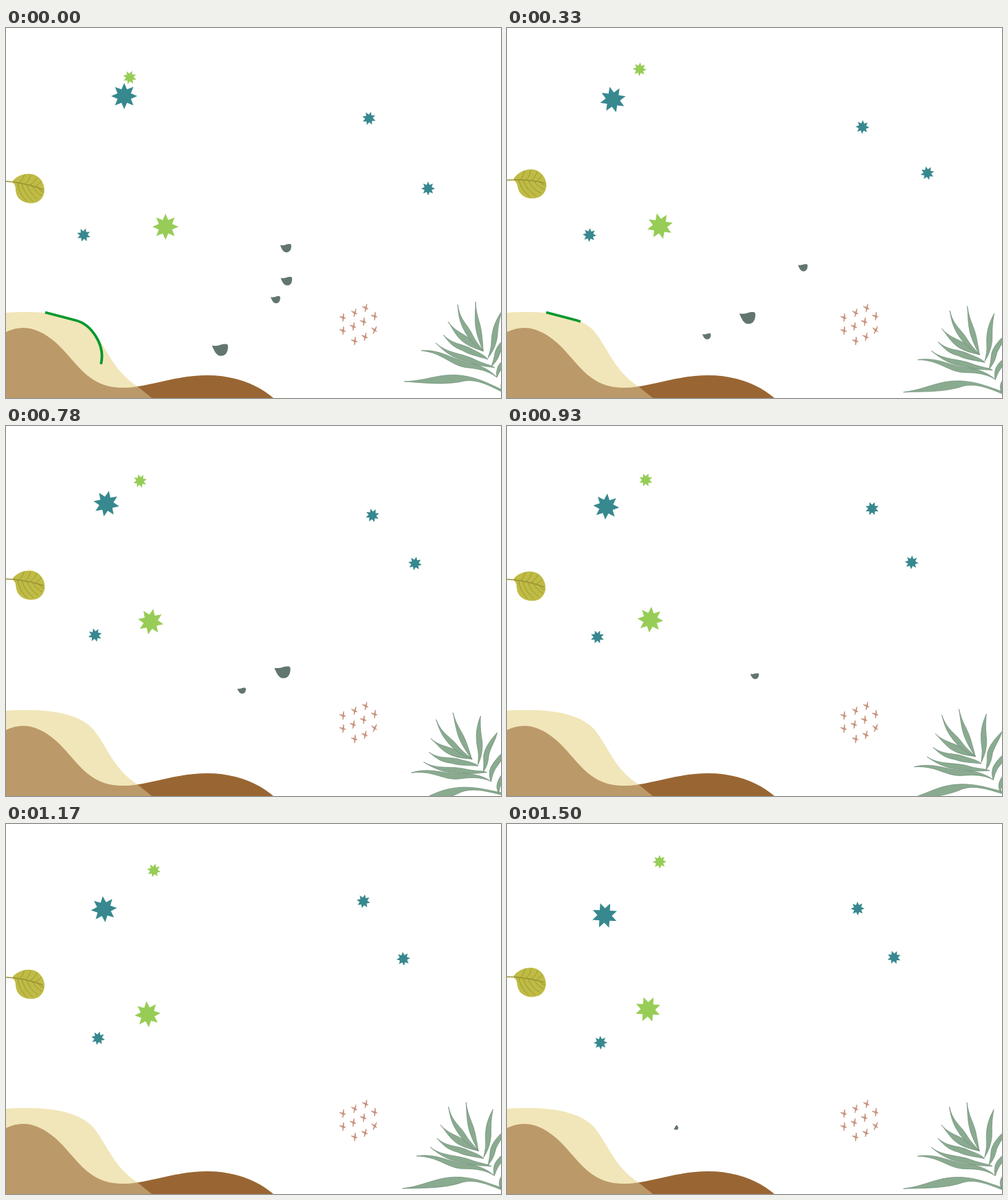
Write an HTML page without scripts that moves like this. It is 720 px wide and 538 px high and loops after 1530 ms.

```html
<!DOCTYPE html>
<html lang="en">
<head>
<meta charset="utf-8">
<title>Drifting garden</title>
<style>
html, body { margin: 0; width: 100%; height: 100%; overflow: hidden; background: #fff; }
svg { display: block; width: 720px; height: 538px; }

.drift, .wander, .spin, .palm, .leaf, .vine, .rock {
  animation: 1.53s linear infinite;
}
.drift { animation-name: drift; }
.wander { animation-name: wander; }
.spin { animation-name: spin; }
.palm { animation-name: sway; transform-origin: 747px 548px; }
.leaf { animation-name: bob; transform-origin: -12px 222px; }
.vine { animation-name: retract; stroke-dasharray: 100 200; }
.rock { animation-name: fly, var(--life); animation-timing-function: linear, var(--pace, step-end); }

.teal { fill: #37888f; }
.lime { fill: #97cd56; }

/* Stars pass through --a to --g; wanderers also bend through the midpoints. */
@keyframes drift {
  0% { translate: var(--a); }
  21.57% { translate: var(--b); }
  35.29% { translate: var(--c); }
  50.98% { translate: var(--d); }
  68.63% { translate: var(--e); }
  84.31% { translate: var(--f); }
  98.04%, 100% { translate: var(--g); }
}
@keyframes wander {
  0% { translate: var(--a); }
  10.78% { translate: var(--ab); }
  21.57% { translate: var(--b); }
  28.43% { translate: var(--bc); }
  35.29% { translate: var(--c); }
  43.14% { translate: var(--cd); }
  50.98% { translate: var(--d); }
  59.8% { translate: var(--de); }
  68.63% { translate: var(--e); }
  76.47% { translate: var(--ef); }
  84.31% { translate: var(--f); }
  91.18% { translate: var(--fg); }
  98.04%, 100% { translate: var(--g); }
}
@keyframes spin { to { rotate: -66deg; } }
@keyframes sway {
  0% { rotate: 0deg; animation-timing-function: cubic-bezier(.45, .1, .8, .65); }
  21.57% { rotate: -5.2deg; }
  35.29% { rotate: -12.2deg; animation-timing-function: ease-out; }
  44.5% { rotate: -14deg; animation-timing-function: ease-in; }
  50.98% { rotate: -13.4deg; }
  68.63% { rotate: -7.7deg; animation-timing-function: ease-out; }
  84.31% { rotate: -4.4deg; }
  90% { rotate: -4.3deg; }
  98.04%, 100% { rotate: -5.5deg; }
}
@keyframes bob {
  0% { rotate: 0deg; }
  21.57% { rotate: -8.2deg; animation-timing-function: ease-out; }
  28% { rotate: -8.6deg; animation-timing-function: ease-in; }
  35.29% { rotate: -7deg; }
  50.98% { rotate: -2.4deg; animation-timing-function: ease-out; }
  68.63% { rotate: 0deg; animation-timing-function: ease-in; }
  84.31% { rotate: -1.6deg; }
  98.04%, 100% { rotate: -3.8deg; }
}
@keyframes retract {
  0% { stroke-dashoffset: 0; }
  21.57% { stroke-dashoffset: 59; }
  35.29% { stroke-dashoffset: 87; }
  43.14%, 100% { stroke-dashoffset: 100.5; }
}
@keyframes fly { to { translate: 178px -216px; } }
@keyframes brief { 11%, to { scale: 0; } }
@keyframes medium { 43%, to { scale: 0; } }
@keyframes long { 60%, to { scale: 0; } }
@keyframes emerge {
  0%, 10% { scale: 0; }
  20%, 76% { scale: 1; }
  76.1%, 100% { scale: 0; }
}
@keyframes sprout {
  0%, 93% { scale: 0; }
  98%, 100% { scale: 1; }
}
</style>
</head>
<body>
<svg viewBox="0 0 720 538">
  <defs>
    <polygon id="star" points="0-19 4-9.700 13.400-13.400 9.700-4 19 0 9.700 4 13.400 13.400 4 9.700 0 19 -4 9.700 -13.400 13.400 -9.700 4 -19 0 -9.700-4 -13.400-13.400 -4-9.700"/>
    <path id="rock" fill="#62766f" d="M-12-6Q-4-5 0-7Q5-9 10-8Q12-6 11-1C10 6 6 9 1 9C-6 9-9 1-12-6Z"/>
    <path id="twig" d="M1-6Q2.500 0 0 6Q-1 0 1-6ZM-5-1.500Q0-1.500 4 1Q0 2.500-5-1.500Z"/>
    <path id="sand" d="M0 414C45 411 100 413 126 440C147 465 155 498 191 521L212 538H0Z"/>
  </defs>

  <!-- hills -->
  <use href="#sand" fill="#f1e6b9"/>
  <path fill="#996633" d="M0 442C24 430 48 436 72 457C104 486 118 523 170 523C206 523 244 505 293 505C335 505 368 520 389 538H0Z"/>
  <use href="#sand" fill="#f1e6b9" opacity=".4"/>
  <path class="vine" pathLength="100" fill="none" stroke="#00982f" stroke-width="3.8" d="M57 413.500L101 425C125 431 145 462 138 489"/>

  <!-- twigs -->
  <g fill="#c8917c" stroke="#c8917c" stroke-width=".8">
    <use href="#twig" transform="translate(490 421)"/>
    <use href="#twig" transform="translate(507 414) rotate(10)"/>
    <use href="#twig" transform="translate(523 407) rotate(8)"/>
    <use href="#twig" transform="translate(536 419)"/>
    <use href="#twig" transform="translate(520 427)"/>
    <use href="#twig" transform="translate(505 434) rotate(4)"/>
    <use href="#twig" transform="translate(490 440)"/>
    <use href="#twig" transform="translate(507 455)"/>
    <use href="#twig" transform="translate(522 449) rotate(8)"/>
    <use href="#twig" transform="translate(536 439) rotate(20)"/>
  </g>

  <!-- palm -->
  <g class="palm" fill="#8aab90" stroke="#66866f" stroke-width=".6">
    <path d="M579 514C615 513 632 500 668 506C690 510 704 518 724 527L723 530C700 518 685 511 668 513C640 520 610 516 579 514Z"/>
    <path d="M604 469C632 467 648 481 670 486C690 490 704 497 714 508C702 499 690 496 672 494C647 492 638 473 604 469Z"/>
    <path d="M625 458C642 474 664 472 684 483C697 489 706 490 711 494C700 492 690 492 674 486C652 481 640 473 625 458Z"/>
    <path d="M636 446C650 461 664 458 680 468C690 473 698 477 701 482C690 478 675 476 664 469C650 464 645 458 636 446Z"/>
    <path d="M643 427C652 441 668 445 677 454C685 461 691 465 695 470C681 466 668 461 659 451C652 443 649 436 643 427Z"/>
    <path d="M657 402C660 425 672 431 679 447C684 457 690 463 694 470C682 462 672 451 666 439C659 425 658 416 657 402Z"/>
    <path d="M683 398C684 420 690 427 692 444C693 455 694 462 694 470C687 453 683 441 682.500 428C682 414 683 408 683 398Z"/>
    <path d="M721 412C710 428 707 440 706 455C706 465 704 470 701 480C709 470 714 458 715 446C716 434 717 426 721 412Z"/>
    <path d="M739 441C724 451 713 462 711 473C710 480 708 486 706 492C715 484 717 477 720 469C726 458 734 452 739 441Z"/>
    <path d="M745 468C732 475 717 486 715 494C713 500 713 504 714 508C717 502 719 497 725 491C733 484 741 478 745 468Z"/>
    <path d="M750 490C737 495 724 507 721 515C719 520 720 524 721 527C725 518 728 512 736 506C744 502 748 496 750 490Z"/>
  </g>

  <!-- leaf -->
  <g class="leaf" fill="none" stroke="#98932f">
    <path fill="#bfbb45" stroke="none" d="M10 222C21 210 42 208 51 221C59 232 57 247 45.500 253C33 258 18 252 15 241C13 233 15 229 10 225Z"/>
    <path stroke-width="1.5" d="M-14 222L12 224Q37 228 54 235"/>
    <path stroke-width=".9" d="M17 225Q18 240 30 252M23 226Q26 241 39 252M30 227Q34 240 46 249M38 229Q43 239 52 244M46 231Q49 237 55 239M20 225Q25 220 27 213M27 227Q34 222 36 214M35 228Q42 224 45 217M43 230Q48 227 52 223"/>
  </g>

  <!-- rocks -->
  <g transform="translate(407 320)"><use href="#rock" class="rock" style="--life:brief" transform="scale(.7)"/></g>
  <g transform="translate(408 368)"><use href="#rock" class="rock" style="--life:brief" transform="scale(.72)"/></g>
  <g transform="translate(392 395)"><use href="#rock" class="rock" style="--life:medium" transform="scale(.6)"/></g>
  <g transform="translate(311.500 468)"><use href="#rock" class="rock" style="--life:long"/></g>
  <g transform="translate(252 495)"><use href="#rock" class="rock" style="--life:emerge;--pace:linear" transform="scale(.54 .5)"/></g>
  <g transform="translate(71.500 654)"><use href="#rock" class="rock" style="--life:sprout;--pace:linear" transform="rotate(-50) scale(.32)"/></g>

  <!-- stars -->
  <g class="drift teal" style="--a:172px 99px;--b:154px 104px;--c:149.500px 107.500px;--d:146px 113px;--e:143px 120.500px;--f:142px 127px;--g:142px 133px">
    <use href="#star" class="spin"/>
  </g>
  <g class="drift lime" style="--a:232px 289px;--b:222.500px 288px;--c:216.500px 287px;--d:210.500px 284.500px;--e:207px 279.500px;--f:205px 274px;--g:205px 269.500px">
    <use href="#star" class="spin"/>
  </g>
  <g class="drift teal" style="--a:113px 301px;--b:120px 301px;--c:124.500px 302px;--d:129.500px 304px;--e:133px 309px;--f:135px 314px;--g:136px 318px">
    <use href="#star" class="spin" transform="rotate(18) scale(.53)"/>
  </g>
  <g class="drift teal" style="--a:614px 233.500px;--b:611.500px 211px;--c:605px 205px;--d:595px 200px;--e:583.500px 197px;--f:572.500px 195px;--g:563px 194px">
    <use href="#star" class="spin" transform="scale(.53)"/>
  </g>
  <g class="wander teal" style="--a:528px 131.500px;--ab:519px 137px;--b:517px 144px;--bc:519px 147px;--c:523px 146px;--cd:529px 139px;--d:533px 130px;--de:531.500px 121px;--e:527px 114px;--ef:520px 112.400px;--f:513px 114px;--fg:511px 118px;--g:510px 123px">
    <use href="#star" class="spin" transform="rotate(18) scale(.53)"/>
  </g>
  <g class="wander lime" style="--a:180px 72px;--ab:188px 64px;--b:193px 60px;--bc:194px 63px;--c:193px 68px;--cd:193px 75px;--d:195px 80px;--de:201px 79px;--e:208px 75px;--ef:215px 67.500px;--f:221px 60px;--fg:222px 57px;--g:222px 55px">
    <use href="#star" class="spin" transform="rotate(18) scale(.53)"/>
  </g>
</svg>
</body>
</html>
```
